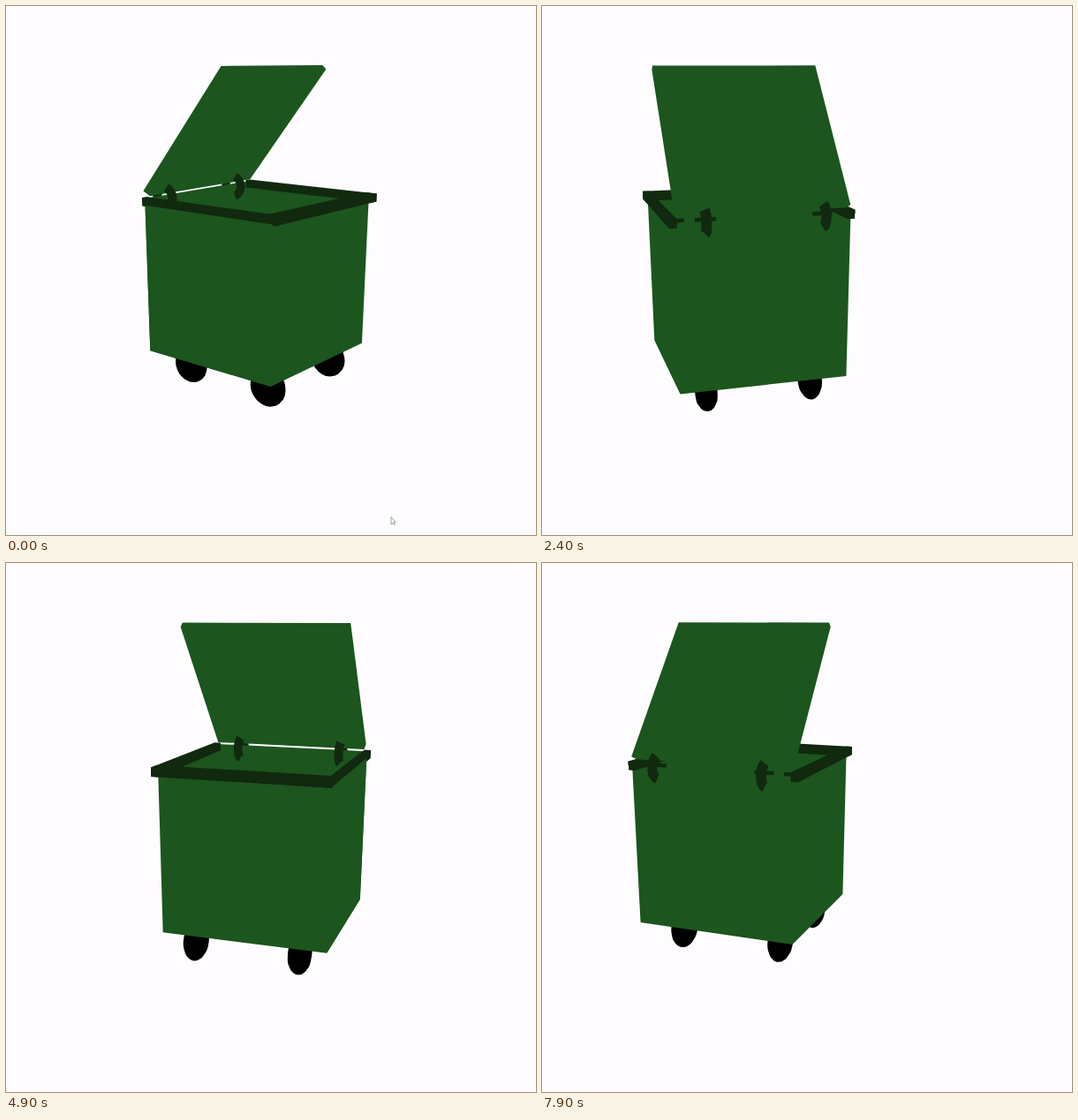
These frames come from a looping animation (600x599 px, 8000 ms). An HTML page:

```html
<!DOCTYPE html>
<html>
<head>
<meta charset="utf-8">
<style>
  html, body { margin: 0; width: 100%; height: 100%; overflow: hidden; background: #fefcff; }
  svg { display: block; }
</style>
</head>
<body>
<svg id="stage" width="600" height="599" viewBox="0 0 600 599"></svg>
<script>
const GREEN = '#1c551e', DARK = '#11290f', BLACK = '#000';
const LOOP = 8000, STEP = 100;
const stage = document.getElementById('stage');

// Dimensions in local axes: u along the hinge, v from hinge to front, y up.
const MIDDLE = 0.235, BODY_HALF = 0.605, RIM_HALF = 0.635, LID_HALF = 0.59;
const BACK = -0.59, BODY_FRONT = 0.6, RIM_FRONT = 0.65;
const RIM_TOP = -0.01, RIM_BASE = -0.072, FLOOR = -1.216;
const RING_GAP = 0.405, RING_RADIUS = 0.08, WHEEL_RADIUS = 0.15, WHEEL_HALF = 0.065;

const range = (n, f) => Array.from({ length: n }, (_, i) => f(i));
const ends = half => [MIDDLE - half, MIDDLE + half];

// A steady turn with a slow drift in speed.
function heading(ms) {
  const s = ms / 1000;
  return (50.6 + 59.5 * s + 3 * Math.sin(2 * Math.PI * s / 9)) * Math.PI / 180;
}

function camera(angle) {
  const c = Math.cos(angle), s = Math.sin(angle);
  return ([u, v, y]) => {
    const x = -0.015 + u * c + v * s;
    const depth = 6.355 + u * s - v * c - 0.32 * y;
    return [265 + 985 * x / depth, 62 + 985 * (1 - 1.05 * y) / depth, depth];
  };
}

function hull(points) {
  const sorted = [...points].sort((a, b) => a[0] - b[0] || a[1] - b[1]);
  const cross = (o, a, b) => (a[0] - o[0]) * (b[1] - o[1]) - (a[1] - o[1]) * (b[0] - o[0]);
  const chain = list => {
    const out = [];
    for (const p of list) {
      while (out.length > 1 && cross(out[out.length - 2], out[out.length - 1], p) <= 0) out.pop();
      out.push(p);
    }
    return out.slice(0, -1);
  };
  return [...chain(sorted), ...chain(sorted.reverse())];
}

const coords = points => points.map(p => p[0].toFixed(1) + ',' + p[1].toFixed(1)).join(' ');

// Sweeps a (v, y) outline between two places on the u axis.
const extrude = ([u0, u1], outline) => [u0, u1].flatMap(u => outline.map(([v, y]) => [u, v, y]));
const bar = (span, v0, v1) =>
  extrude(span, [v0, v1].flatMap(v => [[v, RIM_BASE], [v, RIM_TOP]]));

// A wheel is a stack of discs that narrows towards both sides.
const wheel = (u, v) => range(7, i => (i - 3) / 3).flatMap(k => {
  const r = WHEEL_RADIUS * Math.sqrt(1 - 0.6 * k * k);
  return range(24, j => {
    const a = j * Math.PI / 12;
    return [u + k * WHEEL_HALF, v + r * Math.cos(a), -1.32 + r * Math.sin(a)];
  });
});

const halfRing = (u, side) => range(13, i => {
  const a = (i / 6 - 1) * 1.35;
  return [u, -0.58 + side * RING_RADIUS * Math.cos(a), -0.038 + RING_RADIUS * Math.sin(a)];
});

const [endA, endB] = ends(RIM_HALF);
const WHEELS = ends(0.395).flatMap(u => [-0.33, 0.43].map(v => wheel(u - 0.02, v)));
const BODY = extrude(ends(BODY_HALF),
  [[BACK, RIM_TOP - 0.01], [BODY_FRONT, RIM_BASE], [BACK, FLOOR], [BODY_FRONT, FLOOR]]);
const RIM = [
  bar([endA, endB], RIM_FRONT - 0.09, RIM_FRONT),
  bar([endA, endA + 0.05], BACK, RIM_FRONT),
  bar([endB - 0.05, endB], BACK, RIM_FRONT)
];
const LID = extrude(ends(LID_HALF), [[-0.55, 0], [-0.62, 0.03], [0.15, 0.92], [0.185, 0.892]]);
const RINGS = ends(RING_GAP);
const RODS = [-1, 1].flatMap(side => [[0.33, 0.47], [0.54, RIM_HALF]]
  .map(span => span.map(d => [MIDDLE + side * d, -0.595, -0.022])));

function draw(ms) {
  const project = camera(heading(ms));
  const solid = (points, color) =>
    `<polygon points="${coords(hull(points.map(project)))}" fill="${color}"/>`;
  const line = (points, thickness) => {
    const path = points.map(project);
    return `<polyline points="${coords(path)}" fill="none" stroke="${DARK}" ` +
      `stroke-width="${(thickness * 985 / path[0][2]).toFixed(1)}"/>`;
  };
  const rings = side => RINGS.map(u => line(halfRing(u, side), 0.068));
  const screenX = (u, v) => project([u, v, -0.5])[0];

  const [left, right] = ends(BODY_HALF);
  const hingeInFront = screenX(left, BACK) > screenX(right, BACK);
  const nearEnd = screenX(left, BACK) < screenX(left, BODY_FRONT) ? left : right;

  const parts = WHEELS.map(w => solid(w, BLACK));
  if (!hingeInFront) parts.push(...rings(-1));
  parts.push(solid(BODY, GREEN), ...RIM.map(r => solid(r, DARK)), solid(LID, GREEN));
  if (hingeInFront) {
    parts.push(...rings(-1), ...RODS.map(rod => line(rod, 0.026)));
  } else {
    // The near end wall covers the lower part of the inner ring halves.
    const wall = BODY.filter(([u, , y]) => u === nearEnd)
      .map(([u, v, y]) => [u, v, Math.min(y, RIM_BASE)]);
    parts.push(...rings(1), solid(wall, GREEN));
  }

  if (ms < 1000) {
    const k = ms / 1000;
    parts.push(`<path transform="translate(${436 - 36 * k} ${578.5 + 18 * k})" ` +
      'd="M0 0V8.5L2 6.8L3.3 9L4.4 8.3L3.3 6H5Z" fill="#fff" stroke="#888" stroke-width=".8"/>');
  }
  stage.innerHTML = parts.join('');
}

const start = performance.now();
let shown = -1;
function tick() {
  const elapsed = Math.max(0, performance.now() - start) % LOOP;
  const ms = Math.floor(elapsed / STEP) * STEP;
  if (ms !== shown) draw(shown = ms);
  requestAnimationFrame(tick);
}
tick();
</script>
</body>
</html>
```
